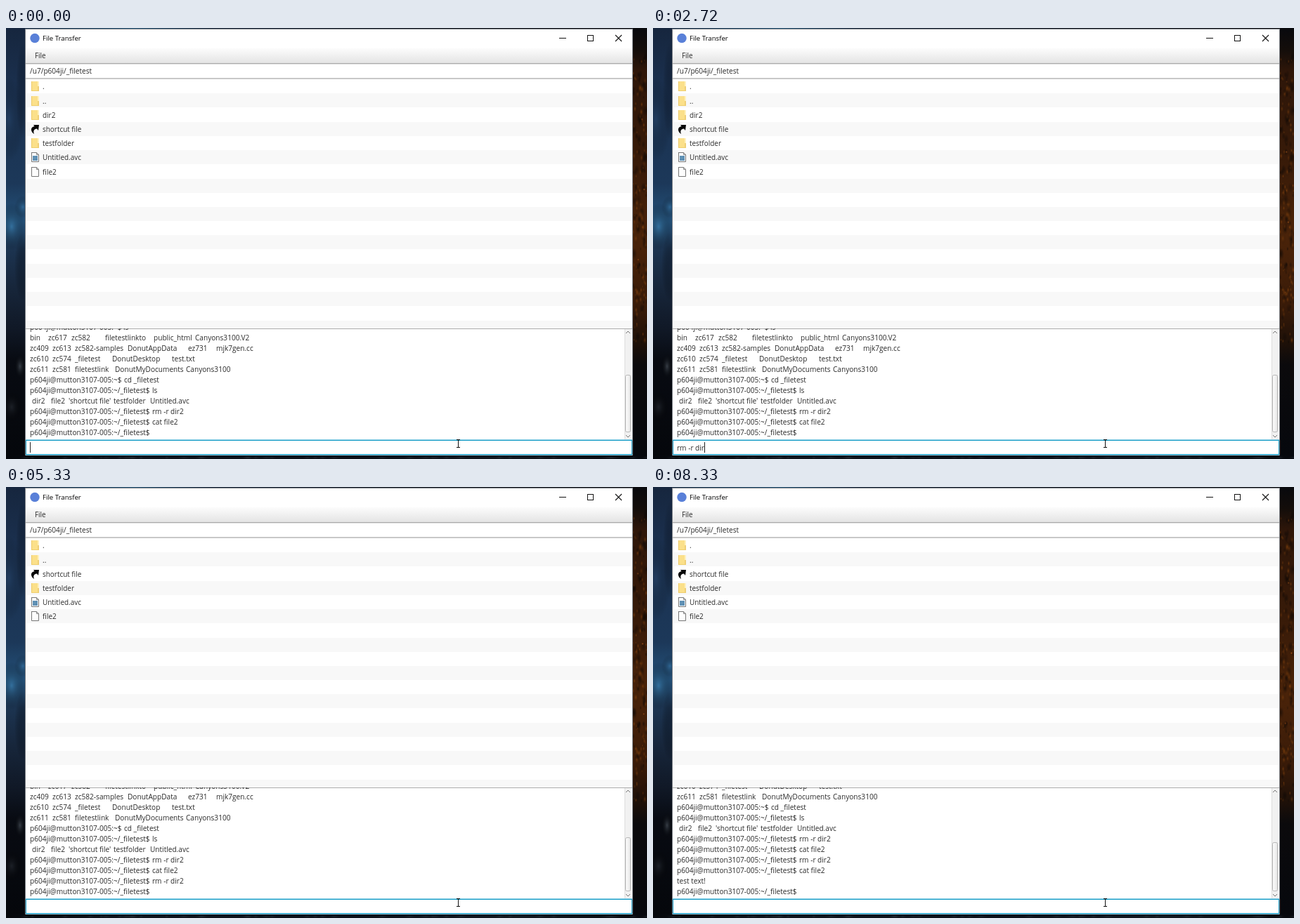
Animation, 912 px wide and 614 px high, one loop 8400 ms. Source, as an HTML page with a canvas:

```html
<!DOCTYPE html>
<html lang="en">
<head>
<meta charset="utf-8">
<title>File Transfer</title>
<style>
html, body { margin: 0; width: 100%; height: 100%; overflow: hidden; background: #0a0d14; }
canvas { display: block; }
</style>
</head>
<body>
<canvas id="stage" width="912" height="614"></canvas>
<script>
const ctx = document.getElementById('stage').getContext('2d');
const LOOP = 8400;
const STEP = 70;
const FIRST_ENTER = 3500;
const SECOND_ENTER = 6600;
const ROW = 20.2;
const LINE = 15;
const INK = '#2b2b2b';

const HOST = 'p604ji@mutton3107-005:';
const HOME = HOST + '~$';
const DIR = HOST + '~/_filetest$';

// Each terminal line is a list of [x, text] pairs.
const history = [
  [[34, HOME], [167, 'ls']],
  [[34, 'bin'], [60, 'zc617'], [93, 'zc582'], [141, 'filetestlinkto'], [210, 'public_html'], [269, 'Canyons3100.V2']],
  [[34, 'zc409'], [66, 'zc613'], [98, 'zc582-samples'], [173, 'DonutAppData'], [259, 'ez731'], [299, 'mjk7gen.cc']],
  [[34, 'zc610'], [66, 'zc574'], [98, '_filetest'], [151, 'DonutDesktop'], [236, 'test.txt']],
  [[34, 'zc611'], [66, 'zc581'], [98, 'filetestlink'], [155, 'DonutMyDocuments'], [256, 'Canyons3100']],
  [[34, HOME], [168, 'cd _filetest']],
  [[34, DIR], [208, 'ls']],
  [[37, 'dir2'], [64, 'file2'], [89, "'shortcut file'"], [153, 'testfolder'], [205, 'Untitled.avc']],
  [[34, DIR], [208, 'rm -r dir2']],
  [[34, DIR], [208, 'cat file2']],
  [[34, DIR], [208, 'rm -r dir2']],
  [[34, DIR], [208, 'cat file2']],
  [[34, 'test text!']]
];

const files = [
  ['folder', '.'], ['folder', '..'], ['folder', 'dir2'], ['link', 'shortcut file'],
  ['folder', 'testfolder'], ['media', 'Untitled.avc'], ['page', 'file2']
];

const typing = [
  { text: 'rm -r dir2', keys: [630, 840, 1260, 1540, 1750, 2030, 2240, 2450, 2660, 2940], enter: FIRST_ENTER },
  { text: 'cat file2', keys: [5460, 5530, 5670, 5740, 5880, 5950, 6020, 6160, 6300], enter: SECOND_ENTER }
];

function box(x, y, w, h, fill) {
  ctx.fillStyle = fill;
  ctx.fillRect(x, y, w, h);
}

function gradient(x0, y0, x1, y1, stops) {
  const g = ctx.createLinearGradient(x0, y0, x1, y1);
  stops.forEach(([p, c]) => g.addColorStop(p, c));
  return g;
}

function path(points, stroke, width = 1, fill) {
  ctx.beginPath();
  points.forEach(([x, y], i) => i ? ctx.lineTo(x, y) : ctx.moveTo(x, y));
  if (fill) {
    ctx.closePath();
    ctx.fillStyle = fill;
    ctx.fill();
  }
  if (stroke) {
    ctx.strokeStyle = stroke;
    ctx.lineWidth = width;
    ctx.stroke();
  }
}

function label(text, x, y, size = 10.1, color = INK) {
  ctx.font = size + 'px "Open Sans", "Noto Sans", sans-serif';
  ctx.fillStyle = color;
  ctx.fillText(text, x, y);
}

function glow(x, y, rx, ry, color, alpha) {
  ctx.save();
  ctx.translate(x, y);
  ctx.scale(rx, ry);
  ctx.globalAlpha = alpha;
  const g = ctx.createRadialGradient(0, 0, 0, 0, 0, 1);
  g.addColorStop(0, color);
  g.addColorStop(1, 'transparent');
  ctx.fillStyle = g;
  ctx.fillRect(-1, -1, 2, 2);
  ctx.restore();
}

function random(seed) {
  return () => {
    seed = (seed * 16807) % 2147483647;
    return seed / 2147483647;
  };
}

function wallpaper(t) {
  box(0, 0, 912, 614, '#080b12');
  box(0, 0, 912, 2, gradient(0, 0, 912, 0, [
    [0, '#16283f'], [.2, '#24587c'], [.32, '#132237'], [.6, '#0c121c'], [1, '#0a0b10']]));

  box(0, 0, 28, 614, gradient(0, 0, 0, 614, [
    [0, '#16263e'], [.15, '#1b3150'], [.36, '#1c3859'], [.45, '#24527b'],
    [.51, '#1c3451'], [.6, '#17263b'], [.7, '#101826'], [.77, '#080b12'], [1, '#05070b']]));
  glow(8, 283, 20, 34, '#3f86b8', .6);
  glow(24, 255, 12, 16, '#3b83b8', .5);
  glow(4, 130, 22, 60, '#27466d', .5);
  glow(24, 90, 10, 70, '#0e1a2e', .5);
  glow(24, 340, 12, 50, '#101d30', .6);
  glow(20, 482, 8, 18, '#66717c', .5);
  glow(8, 540, 14, 22, '#252a32', .7);

  box(891, 0, 21, 614, gradient(0, 0, 0, 614, [
    [0, '#08090d'], [.05, '#130d0a'], [.1, '#2e1609'], [.3, '#371a08'],
    [.48, '#4a2309'], [.64, '#3a1b08'], [.73, '#1e1008'], [.78, '#0b0a0c'], [1, '#06080d']]));

  // Rough bark lit by a flickering fire.
  const rand = random(371);
  ctx.save();
  ctx.beginPath();
  ctx.rect(892, 0, 20, 614);
  ctx.clip();
  for (let i = 0; i < 180; i++) {
    const x = 892 + rand() * 20;
    const y = 35 + rand() * 415;
    const r = 1.2 + rand() * 3.2;
    const phase = rand() * 6.28;
    const pulse = .42 + .12 * Math.sin(t / LOOP * Math.PI * 8 + phase);
    glow(x, y, r, r * 2, i % 2 ? '#a1500f' : '#0c0706', pulse);
  }
  for (let i = 0; i < 4; i++) {
    const p = (t / LOOP * 2 + i / 4) % 1;
    const x = 904 + 5 * Math.sin(p * 9 + i * 2);
    glow(x, 430 - p * 400, 2.5, 2.5, '#f07a26', .65 * Math.sin(p * Math.PI));
  }
  ctx.restore();

  box(0, 608, 912, 6, gradient(0, 0, 912, 0, [
    [0, '#05070b'], [.2, '#0d141d'], [.55, '#0a1019'], [.8, '#111820'], [1, '#06080d']]));
  for (let i = 0; i < 40; i++) {
    glow(rand() * 912, 612, 4 + rand() * 12, 3, '#3a4652', .3);
  }
}

function page(y) {
  path([[36.5, y - 6.5], [43.5, y - 6.5], [46.5, y - 3.5], [46.5, y + 6.5], [36.5, y + 6.5], [36.5, y - 7]],
    '#777', 1, '#fdfdfd');
  path([[43.5, y - 6.5], [43.5, y - 3.5], [46.5, y - 3.5]], '#888');
}

const icons = {
  folder(y) {
    box(36, y - 7, 11, 14, '#fbe08a');
    box(36, y - 7, 1, 14, '#edca68');
    box(45, y - 7, 2, 7, '#fff0bd');
    box(45, y, 2, 7, '#efd077');
    box(36, y + 6, 11, 1, '#efcf70');
  },
  link(y) {
    ctx.beginPath();
    ctx.moveTo(40, y + 7);
    ctx.bezierCurveTo(35, y + 4, 34, y - 3, 40.5, y - 4);
    ctx.lineTo(39, y - 6);
    ctx.lineTo(47, y - 6);
    ctx.lineTo(46, y + 2);
    ctx.lineTo(44, y - .5);
    ctx.bezierCurveTo(39.5, y, 38.5, y + 3, 40, y + 7);
    ctx.closePath();
    ctx.fillStyle = '#080808';
    ctx.fill();
  },
  media(y) {
    page(y);
    box(38, y - 2, 7, 7, '#5f90b4');
  },
  page
};

function titleBar() {
  // Thin frame around the whole window.
  box(27, 1, 865, 608, '#7b7f85');
  box(28, 2, 863, 27, '#fff');
  ctx.beginPath();
  ctx.arc(41, 14.5, 6.7, 0, 7);
  ctx.fillStyle = '#5980d8';
  ctx.fill();
  label('File Transfer', 52, 18.3, 9.65, '#000');
  box(787, 14, 10, 1, '#111');
  ctx.strokeStyle = '#111';
  ctx.lineWidth = 1;
  ctx.strokeRect(827.5, 10.5, 8, 8);
  path([[867, 10], [876, 19]], '#111', 1.1);
  path([[876, 10], [867, 19]], '#111', 1.1);

  box(28, 29, 863, 21, gradient(0, 29, 0, 50, [[0, '#fcfcfc'], [1, '#e4e4e4']]));
  label('File', 41, 43, 9.9);
  box(28, 50, 863, 1, '#aaa');
  box(28, 51, 863, 1, '#e0e0e0');
  box(28, 52, 863, 19, '#fff');
  label('/u7/p604ji/_filetest', 34, 65);
  box(28, 71, 863, 1, '#c8c8c8');
  box(28, 72, 863, 1, '#c8c8c8');
}

function fileList(t) {
  box(28, 73, 863, 355, '#fff');
  for (let i = 1; i < 18; i += 2) {
    const top = Math.round(73.2 + i * ROW);
    box(28, top, 863, Math.min(20, 428 - top), '#f8f8f8');
  }
  const shown = files.filter(f => t < FIRST_ENTER || f[1] !== 'dir2');
  shown.forEach(([kind, name], i) => {
    const y = Math.round(83.3 + i * ROW);
    icons[kind](y);
    label(name, 52, y + 4, 9.95);
  });
}

function terminal(t) {
  box(28, 428, 863, 159, '#fff');
  box(28, 428, 863, 1, '#adadad');
  const count = t < FIRST_ENTER ? 10 : t < SECOND_ENTER ? 11 : 13;
  const lines = history.slice(0, count).concat([[[34, DIR]]]);
  ctx.save();
  ctx.beginPath();
  ctx.rect(29, 428, 850, 158);
  ctx.clip();
  lines.forEach((line, i) => {
    const y = 580 - (lines.length - 1 - i) * LINE;
    if (y > 425) line.forEach(([x, text]) => label(text, x, y));
  });
  ctx.restore();

  const top = count === 10 ? 494 : count === 11 ? 499 : 506;
  box(880, 429, 10, 157, '#f1f1f1');
  box(880, 429, 1, 157, '#dcdcdc');
  ctx.beginPath();
  ctx.roundRect(881.5, top + .5, 7, 575 - top, 2);
  ctx.fillStyle = gradient(881, 0, 889, 0, [[0, '#fff'], [1, '#e5e5e5']]);
  ctx.fill();
  ctx.strokeStyle = '#b5b5b5';
  ctx.lineWidth = 1;
  ctx.stroke();
  path([[882, 435], [885, 432], [888, 435]], '#777');
  path([[882, 580], [885, 583], [888, 580]], '#777');
}

function inputField(t) {
  box(28, 586, 863, 23, '#8fd0e6');
  box(28, 587, 863, 21, '#169cc6');
  box(29, 588, 861, 19, '#fff');

  let text = '';
  let lastKey = 0;
  for (const cmd of typing) {
    const typed = cmd.keys.filter(k => k <= t);
    if (typed.length) lastKey = typed[typed.length - 1];
    if (t >= cmd.enter) lastKey = cmd.enter;
    else text += cmd.text.slice(0, typed.length);
  }
  label(text, 34, 602);
  if ((t - lastKey) % 1000 < 500) {
    const x = 34 + Math.round(ctx.measureText(text).width);
    box(x, 590, 1, 15, '#222');
  }
}

function pointer() {
  box(643, 586, 1, 12, '#111');
  box(641, 586, 5, 1, '#111');
  box(641, 597, 5, 1, '#111');
}

function draw(t) {
  wallpaper(t);
  titleBar();
  fileList(t);
  terminal(t);
  inputField(t);
  pointer();
}

const start = performance.now();
function frame() {
  const t = (performance.now() - start) % LOOP;
  draw(Math.floor(t / STEP) * STEP);
  requestAnimationFrame(frame);
}
frame();
</script>
</body>
</html>
```
